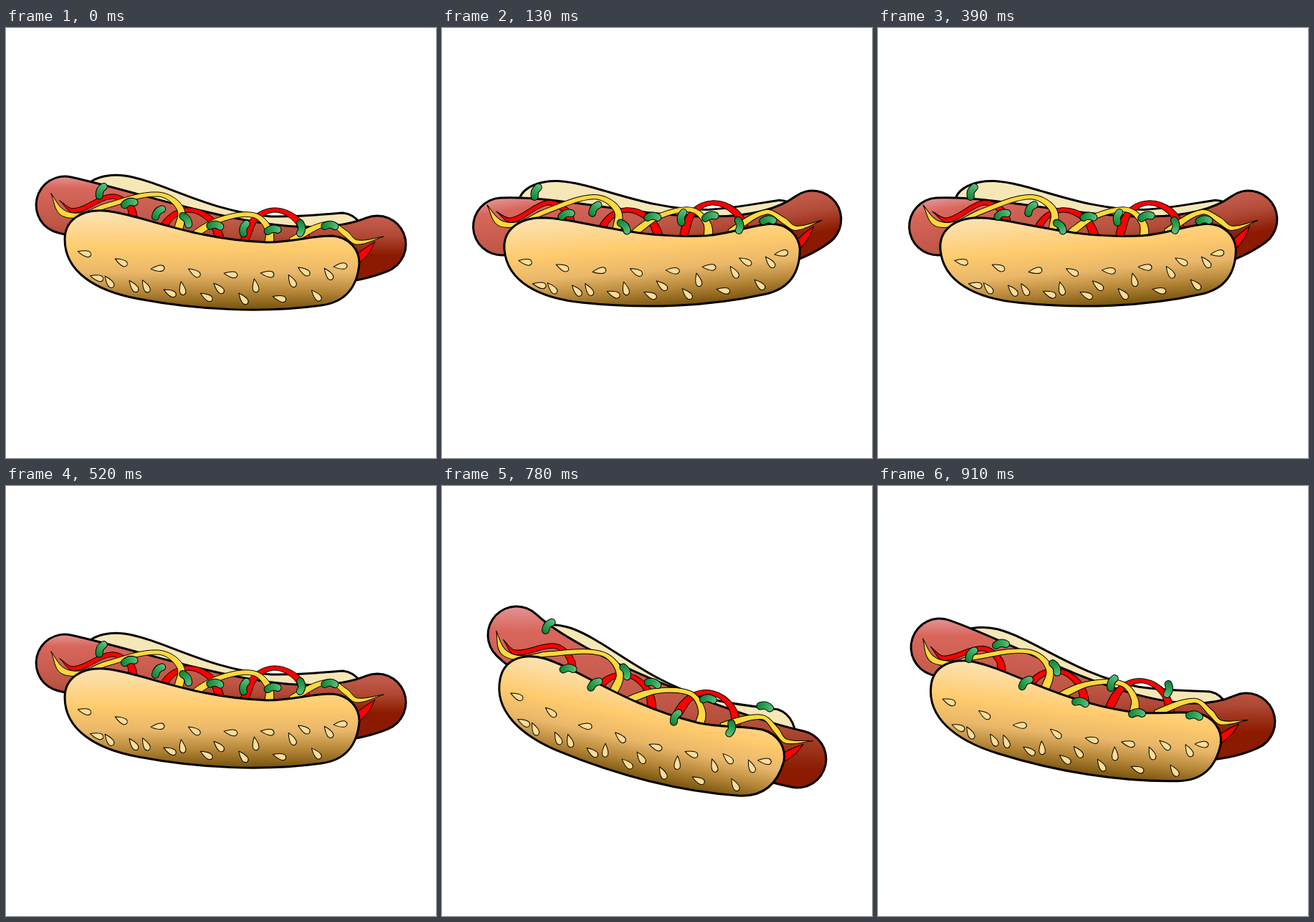
An HTML page with a canvas that plays this animation: 600x600 px, repeating every 1.04 s.

```html
<!DOCTYPE html>
<html lang="en">
<head>
<meta charset="utf-8">
<title>Wiggling hot dog</title>
<style>
html, body { margin: 0; width: 100%; height: 100%; overflow: hidden; background: #fff; }
canvas { display: block; }
</style>
</head>
<body>
<canvas id="stage" width="600" height="600"></canvas>
<script>
const ctx = document.getElementById('stage').getContext('2d');
const STEP = 130;
const PIVOT = [138, 300];
const SAUSAGE_WIDTH = 80;
const HOP = 18;

// Bun, sauces, seeds and relish are drawn level, then turned about PIVOT.
const frontBun = new Path2D(`M82 295C82 268 105 253 137 255C190 260 260 296 365 299
  C400 299 425 290 455 290C480 292 493 310 493 328C490 365 470 383 440 387
  C360 398 270 394 185 378C125 367 82 340 82 295Z`);
const backBun = new Path2D(`M109 226C115 210 140 203 165 206C220 214 280 256 370 263
  C410 264 440 260 470 258C490 260 503 280 503 300L480 345 300 340 130 270Z`);
const seed = new Path2D('M10 0C4-3-2-5-6-4C-10-2-10 2-6 4C-2 5 4 3 10 0Z');
const pickle = new Path2D('M-7 2Q0-3 7 1');

const arch = x => ribbon([[x - 44, 297], [x - 28, 266], [x, 254], [x + 30, 268], [x + 44, 297]]);
const redSauce = [
  ribbon([[75, 241], [95, 255], [147, 235], [172, 248], [178, 268]], 'start'),
  arch(256),
  arch(376),
  ribbon([[486, 327], [503, 311], [515, 298]], 'end')
];
const yellowSauce = [
  ribbon([[63, 231], [78, 257], [105, 261], [140, 248], [212, 232], [243, 252], [240, 285]], 'start'),
  ribbon([[262, 288], [300, 267], [345, 261], [366, 280], [367, 305]]),
  ribbon([[398, 296], [450, 273], [474, 287], [490, 299], [527, 291]], 'end')
];

const crust = gradient([0, 255, 0, 394],
  [[0, '#fbe3b4'], [.38, '#ffcb6d'], [.62, '#e9b769'], [.8, '#b98a3c'], [1, '#74500a']]);
const green = gradient([-12, 0, 12, 0], [[0, '#0f8038'], [.5, '#2da455'], [1, '#62c088']]);
const meat = [[0, '#e39494'], [.15, '#d9665c'], [.6, '#be5746'], [.75, '#b04a36'], [1, '#8b1a00']];

// spine: Bezier along the sausage; shade: its gradient line; hops: relish moved up or down
const level = makePose(0, [138, 300], '000000000',
  [82, 247, 210, 275, 400, 350, 518, 302], [87, 207, 87, 317]);
const rightUp = makePose(-9.5, [148.5, 319], '-+-+---++',
  [85, 307, 180, 268, 420, 340, 516, 232], [85, 267, 125, 395]);
const leftUp = makePose(6.7, [129, 290], '+-+-+-+-+',
  [86, 225, 190, 260, 390, 385, 514, 329], [86, 185, 86, 344]);
const leftHigh = makePose(11.8, [135, 285], '-++--+-+-',
  [104, 208, 175, 275, 400, 360, 496, 381], [104, 168, 104, 396]);
const halfRight = halfway(level, rightUp);
const CYCLE = [level, halfRight, rightUp, halfRight, level, leftUp, leftHigh, leftUp];

function makePose(turn, at, hops, spine, shade) {
  const hop = [...hops].map(c => ({ '+': HOP, '-': -HOP })[c] || 0);
  return { turn: [turn], at, hop, spine, shade };
}

function halfway(a, b) {
  const pose = {};
  for (const key in a) pose[key] = a[key].map((v, i) => (v + b[key][i]) / 2);
  return pose;
}

// Smooth closed curve; handles are a third of each segment.
function smooth(points) {
  const n = points.length;
  const dirs = points.map((p, i) => {
    const a = points[(i + n - 1) % n], b = points[(i + 1) % n];
    const dx = b[0] - a[0], dy = b[1] - a[1], len = Math.hypot(dx, dy) || 1;
    return [dx / len, dy / len];
  });
  const path = new Path2D();
  path.moveTo(...points[0]);
  points.forEach((p, i) => {
    const j = (i + 1) % n, q = points[j];
    const h = Math.hypot(q[0] - p[0], q[1] - p[1]) / 3;
    path.bezierCurveTo(p[0] + dirs[i][0] * h, p[1] + dirs[i][1] * h,
      q[0] - dirs[j][0] * h, q[1] - dirs[j][1] * h, q[0], q[1]);
  });
  path.closePath();
  return path;
}

// A band along a line, broader where it runs steeply, pointed at one end if asked.
function ribbon(line, pointed) {
  const left = [], right = [], last = line.length - 1;
  line.forEach(([x, y], i) => {
    const a = line[Math.max(i - 1, 0)], b = line[Math.min(i + 1, last)];
    const dx = b[0] - a[0], dy = b[1] - a[1], len = Math.hypot(dx, dy);
    const isTip = pointed === 'start' && i === 0 || pointed === 'end' && i === last;
    const k = isTip ? 0 : (3 + 2 * Math.abs(dy) / len) / len;
    left.push([x - dy * k, y + dx * k]);
    right.unshift([x + dy * k, y - dx * k]);
  });
  return smooth([...left, ...right]);
}

function gradient(ends, stops) {
  const g = ctx.createLinearGradient(...ends);
  stops.forEach(([at, color]) => g.addColorStop(at, color));
  return g;
}

function paint(path, fill, width) {
  ctx.fillStyle = fill;
  ctx.strokeStyle = '#000';
  ctx.lineWidth = width;
  ctx.fill(path);
  ctx.stroke(path);
}

// A thick round-ended line with a dark edge
function tube(path, width, color, edge) {
  for (const [w, c] of [[width + edge, '#000'], [width - edge, color]]) {
    ctx.lineWidth = w;
    ctx.strokeStyle = c;
    ctx.stroke(path);
  }
}

function placed(x, y, degrees, draw) {
  ctx.save();
  ctx.translate(x, y);
  ctx.rotate(degrees * Math.PI / 180);
  draw();
  ctx.restore();
}

// Columns of three seeds (high, low, middle) following the curve of the bun
function drawSeeds() {
  for (let i = 0; i < 22; i++) {
    const col = Math.floor(i / 3), row = i % 3;
    const x = 110 + 17 * i;
    const y = 344 - 1.6 * (col - 4.3) ** 2 + [0, 34, 40 - 6 * col][row];
    const tip = [195, 215, 245][row] + 20 * Math.sin(5 * i);
    placed(x, y, tip, () => paint(seed, '#fddc98', 1));
  }
}

function drawRelish(hop) {
  [-60, -10, -45, 60, 8, -70, -5, 95, 5].forEach((angle, i) => {
    const y = 281 - 1.5 * (i - 6) ** 2 + hop[i];
    placed(132 + 40 * i, y, angle, () => tube(pickle, 10, green, 1));
  });
}

function drawPose({ turn, at, hop, spine, shade }) {
  const withBun = draw => placed(...at, turn[0], () => {
    ctx.translate(-PIVOT[0], -PIVOT[1]);
    draw();
  });
  ctx.fillStyle = '#fff';
  ctx.fillRect(0, 0, 600, 600);
  ctx.lineJoin = ctx.lineCap = 'round';

  withBun(() => paint(backBun, '#f6e7b7', 3));
  const sausage = new Path2D();
  sausage.moveTo(spine[0], spine[1]);
  sausage.bezierCurveTo(...spine.slice(2));
  tube(sausage, SAUSAGE_WIDTH, gradient(shade, meat), 3);
  withBun(() => {
    redSauce.forEach(path => paint(path, '#f00', 1));
    yellowSauce.forEach(path => paint(path, '#ffd83d', 1));
    paint(frontBun, crust, 3);
    drawSeeds();
    drawRelish(hop);
  });
}

function tick() {
  drawPose(CYCLE[Math.floor(performance.now() / STEP) % CYCLE.length]);
  requestAnimationFrame(tick);
}
tick();
</script>
</body>
</html>
```
